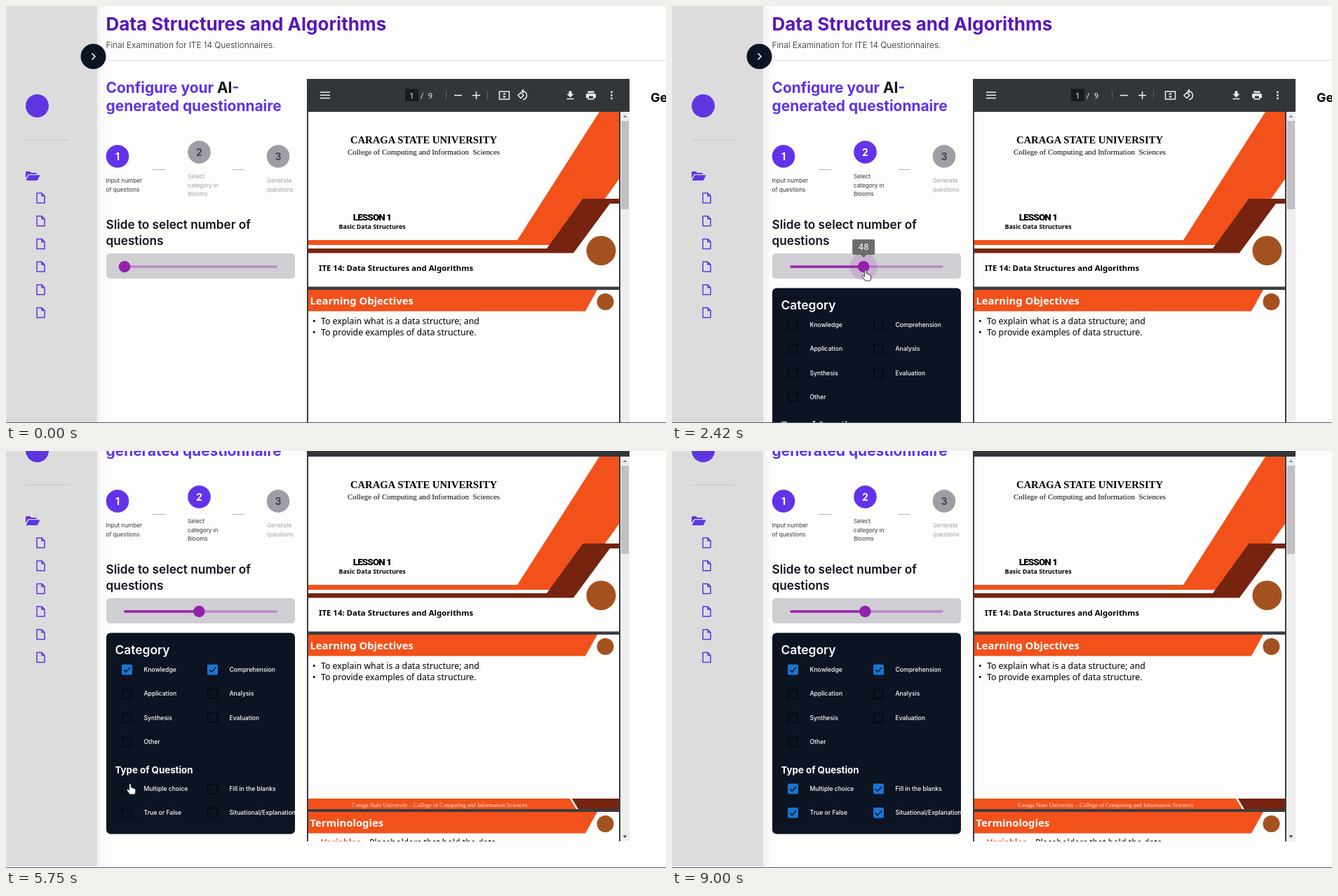
Write an HTML page that moves like this. It is 941 px wide and 595 px high and loops after 9.08 s.

```html
<!DOCTYPE html>
<html lang="en">
<head>
<meta charset="utf-8">
<title>Questionnaire setup</title>
<style>
html, body { margin: 0; width: 100%; height: 100%; overflow: hidden; background: #fdfdfc; }
svg { display: block; width: 100vw; height: 100vh; font-family: Inter, sans-serif; }
text { white-space: pre; }
.mid { text-anchor: middle; }
.title { font-size: 26px; font-weight: 700; fill: #5a17b8; }
.config { font-size: 20.9px; font-weight: 700; fill: #5f32ea; }
.slide { font-size: 17.2px; font-weight: 600; fill: #10131c; }
.step { font-size: 8.2px; fill: #333; }
.num { font-size: 14px; font-weight: 700; fill: #fff; text-anchor: middle; }
.off circle { fill: #9e9ea6; }
.off .num { fill: #44444f; }
.off .step { fill: #a0a0a4; }
.label { font-size: 8.65px; font-weight: 500; fill: #fff; }
.serif { font-family: "Liberation Serif", serif; }
.noto { font-family: "Noto Sans", sans-serif; }
.bold { font-weight: 700; }
.head { font-size: 14.8px; font-weight: 700; fill: #fff; }
.line { fill: none; stroke-width: 1.5; }
</style>
</head>
<body>
<svg viewBox="0 0 941 595" preserveAspectRatio="none">
  <defs>
    <clipPath id="view"><rect x="429" y="104" width="460" height="596"/></clipPath>
    <clipPath id="card"><rect x="143" y="402.5" width="269.5" height="287"/></clipPath>
    <linearGradient id="shade">
      <stop stop-color="#f3f3f3"/><stop offset="1" stop-color="#fdfdfc"/>
    </linearGradient>
    <path id="file" class="line" stroke="#5f35e0" stroke-linejoin="round"
      d="M-5.5-7H1.5L5.5-3V7H-5.5ZM1.5-7V-3H5.5"/>
  </defs>
  <g id="page">
    <rect x="130" width="14" height="736" fill="url(#shade)"/>
    <rect width="130" height="736" fill="#dcdcdd"/>
    <circle cx="44.5" cy="142.5" r="16.5" fill="#5f35e0"/>
    <path d="M28 191.5H89" stroke="#c4c4c8"/>
    <path d="M28 246V237.5Q28 236 29.5 236H34L36 238H42.5Q44 238 44 240H33Q31.5 240 30.8 241.2ZM33.2 241.3H48.5L45 248.3Q44.6 249 43.8 249H28.5L32 242Q32.4 241.3 33.2 241.3Z" fill="#5f35e0"/>
    <g id="files"></g>
    <text class="title" x="142.5" y="35">Data Structures and Algorithms</text>
    <text x="142.5" y="60" font-size="11.9" font-weight="300" fill="#222">Final Examination for ITE 14 Questionnaires.</text>
    <path d="M130 77.5H941" stroke="#dedee2"/>
    <circle cx="124.5" cy="72" r="18" fill="#0c1424"/>
    <path class="line" d="M122.5 67.5L127 72L122.5 76.5" stroke="#fff"/>

    <text class="config" x="142.5" y="123.5">Configure your <tspan fill="#10131c">AI</tspan>-</text>
    <text class="config" x="142.5" y="149.5">generated questionnaire</text>
    <g id="steps"></g>
    <path d="M209 233.5H227M322.5 233.5H339.5" stroke="#b4b4b8"/>
    <text class="slide" x="142.5" y="318">Slide to select number of</text>
    <text class="slide" x="142.5" y="341">questions</text>

    <rect x="143" y="353" width="269" height="36" rx="5" fill="#cfcfd3"/>
    <g fill="none" stroke="#9c27b0" stroke-width="3.5" stroke-linecap="round">
      <path d="M170 372H385" opacity=".42"/>
      <path id="track"/>
    </g>
    <g id="thumb">
      <circle id="halo" fill="#9c27b0" opacity=".18"/>
      <circle r="8.3" fill="#9321ab"/>
      <g id="tip">
        <path d="M-14-39H14Q16-39 16-37V-19Q16-17 14-17H4L0-13L-4-17H-14Q-16-17-16-19V-37Q-16-39-14-39Z" fill="#6c6c6c"/>
        <text id="value" class="mid" y="-24" font-size="12" fill="#fff"></text>
      </g>
    </g>

    <g id="panel">
      <rect x="143" y="402.5" width="269" height="287" rx="6" fill="#0c1322"/>
      <text x="155.5" y="432.5" font-size="17.4" font-weight="600" fill="#fff">Category</text>
      <text x="155.5" y="602.5" font-size="13.3" font-weight="700" fill="#fff">Type of Question</text>
      <g id="boxes" clip-path="url(#card)"></g>
    </g>

    <text x="919" y="136.5" font-size="18" font-weight="700" fill="#000">Ge</text>
    <g clip-path="url(#view)">
      <rect x="429" y="104" width="460" height="596" fill="#3a3d41"/>
      <rect x="429" y="104" width="460" height="47" fill="#323639"/>
      <g class="line" stroke="#f1f1f1" stroke-width="1.5">
        <path d="M448 123H462M448 127.3H462M448 131.5H462M639 127.5H650M665 127.5H676M670.5 122V133"/>
        <path d="M703.5 122H717.5V133H703.5Z"/>
        <path d="M734 123.5L738 127.5L734 131.5L730 127.5ZM736 121.5A6 6 0 1 1 737 133.5M738 119L735.5 121.5L738 124"/>
        <path d="M799.5 132.5H809.5"/>
      </g>
      <path d="M627.5 121V133M686.5 121V133" stroke="#63676a"/>
      <rect x="569" y="118" width="19" height="18" fill="#191b1c"/>
      <g fill="#f1f1f1">
        <g class="mid" font-family="Roboto, sans-serif" font-size="11.5">
          <text x="578.5" y="131.5">1</text><text x="593" y="131.5">/</text><text x="605" y="131.5">9</text>
        </g>
        <path d="M710.5 123.5L713 126.5H708ZM710.5 131.5L713 128.5H708Z"/>
        <path d="M802.5 121.5H806.5V125.5H809.5L804.5 130.5L799.5 125.5H802.5Z"/>
        <path d="M829.5 121.5H838.5V124H829.5ZM828.5 125H839.5Q841 125 841 126.5V131H838.5V133.5H829.5V131H827V126.5Q827 125 828.5 125ZM831 128.5V132H837V128.5Z" fill-rule="evenodd"/>
        <circle cx="863.5" cy="123" r="1.4"/><circle cx="863.5" cy="127.5" r="1.4"/><circle cx="863.5" cy="132" r="1.4"/>
      </g>

      <rect x="876" y="151" width="13" height="549" fill="#eeeeef"/>
      <rect x="877" y="164" width="11" height="126" fill="#c1c1c3"/>
      <path d="M879.5 159L882.5 155.5L885.5 159Z" fill="#8b8b8b"/>
      <path d="M879.5 691.5L882.5 695L885.5 691.5Z" fill="#444"/>

      <path d="M431 151H874V400.5H431ZM431 405H874V654H431ZM431 658H874V700H431Z" fill="#fdfdfc"/>
      <path d="M846 151H874V247L854 275H822L775 341H431V334H729Z" fill="#f2511b"/>
      <path d="M822 275H874V282H861L809 352.5H431V346H771Z" fill="#762310"/>
      <g class="mid" fill="#000">
        <text class="serif bold" x="595.5" y="196" font-size="14.7">CARAGA STATE UNIVERSITY</text>
        <text class="serif" x="595.5" y="211.5" font-size="11.05">College of Computing and Information  Sciences</text>
        <text x="522" y="305.5" font-family="Roboto, sans-serif" font-size="13.5" font-weight="900" letter-spacing="-.9">LESSON 1</text>
        <text class="noto bold" x="522" y="318" font-size="8.9">Basic Data Structures</text>
      </g>
      <text class="noto bold" x="446" y="378" font-size="11.4">ITE 14: Data Structures and Algorithms</text>
      <circle cx="848.5" cy="349" r="21" fill="#a3521f"/>

      <g id="heads" class="noto"></g>
      <g class="noto" font-size="12.3" fill="#000">
        <text x="437" y="454">•</text><text x="449" y="454">To explain what is a data structure; and</text>
        <text x="437" y="469.5">•</text><text x="449" y="469.5">To provide examples of data structure.</text>
        <text class="bold" x="449" y="705.5" fill="#f2511b">Variables</text>
        <text x="518" y="705.5">Placeholders that hold the data</text>
      </g>
      <path d="M431 639H804L813 654H431Z" fill="#f2511b"/>
      <path d="M807 639H874V654H816Z" fill="#762310"/>
      <text class="serif mid" x="618" y="650.5" font-size="8.35" fill="#fbe3d8">Caraga State University – College of Computing and Information Sciences</text>
    </g>
  </g>
  <path d="M0 594.5H941" stroke="#55556f"/>
  <g id="cursor" stroke-linejoin="round">
    <path id="hand" fill="#fff" stroke="#222" stroke-width=".9" d="M-1.3 1Q-1.3-.5 0-.5Q1.3-.5 1.3 1V5Q3.5 4.5 3.8 6Q5.8 5.5 6 7Q7.8 6.8 7.8 8.5V11Q7.8 12.5 6.5 15H-.5L-4.5 9.5Q-5.3 8-4 7.5Q-3 7.2-1.3 9Z"/>
    <path id="arrow" fill="#fff" stroke="#222" stroke-width=".9" d="M0 0V13.5L3.2 10.5L5.4 15.3L7.4 14.4L5.3 9.7H9.6Z"/>
    <path id="beam" fill="none" stroke="#555" d="M-3-6H-1Q0-6 0-5V5Q0 6-1 6H-3M3-6H1Q0-6 0-5M0 5Q0 6 1 6H3"/>
  </g>
</svg>
<script>
const LOOP = 9080, PICK = 1520;
const $ = id => document.getElementById(id);
const set = (el, attrs) => { for (const k in attrs) el.setAttribute(k, attrs[k]); };
const show = (el, on) => el.setAttribute('visibility', on ? 'visible' : 'hidden');

$('files').innerHTML = Array.from({ length: 6 }, (_, i) =>
  `<use href="#file" x="49.5" y="${274 + 32.7 * i}"/>`).join('');

const steps = [
  [159, 214.5, 142.5, 'Input number', 'of questions'],
  [275.5, 208.5, 259, 'Select', 'category in', 'Blooms'],
  [388, 214.5, 372, 'Generate', 'questions']
];
$('steps').innerHTML = steps.map(([x, y, left, ...lines], i) =>
  `<g class="${i ? 'off' : ''}"><circle cx="${x}" cy="${y}" r="16.3" fill="#6233ea"/>
  <text class="num" x="${x}" y="${y + 5}">${i + 1}</text>` +
  lines.map((s, k) => `<text class="step" x="${left}" y="${y + 37.7 + 12.6 * k}">${s}</text>`).join('') +
  '</g>').join('');

$('heads').innerHTML = [['Learning Objectives', 405], ['Terminologies', 658]].map(([s, y]) =>
  `<path d="M431 ${y}H843L826 ${y + 30.5}H431Z" fill="#f2511b"/>
  <text class="head" x="433.5" y="${y + 21}">${s}</text>
  <circle cx="854.5" cy="${y + 17}" r="12" fill="#a3521f"/>`).join('');

// label, column, row centre, time of the click
const options = [
  ['Knowledge', 0, 455, 3200], ['Comprehension', 1, 455, 4050],
  ['Application', 0, 489.3], ['Analysis', 1, 489.3],
  ['Synthesis', 0, 523.5], ['Evaluation', 1, 523.5],
  ['Other', 0, 557.7],
  ['Multiple choice', 0, 625, 5880], ['Fill in the blanks', 1, 625, 6950],
  ['True or False', 0, 659.3, 6400], ['Situational/Explanation', 1, 659.3, 7500]
];
$('boxes').innerHTML = options.map(([s, col, y]) =>
  `<g transform="translate(${172.5 + 122 * col} ${y})">
  <circle class="ripple" r="15" fill="#1976d2" opacity="0"/>
  <rect x="-6.7" y="-6.7" width="13.4" height="13.4" rx="1.5" fill="none" stroke="#03060d" stroke-width="1.6"/>
  <g class="tick"><rect x="-7.5" y="-7.5" width="15" height="15" rx="2" fill="#1976d2"/>
  <path class="line" d="M-4.5 .3L-1.5 3.3L4.8-3.3" stroke="#0c1322"/></g>
  <text class="label" x="24" y="3">${s}</text></g>`).join('');
const boxes = [...$('boxes').children];

const smooth = u => u * u * (3 - 2 * u);
const linear = u => u;

// Value of column c in keys [time, ...values] at time t
function at(keys, t, ease = smooth, c = 1) {
  const n = keys.findIndex(k => k[0] > t);
  if (n < 0) return keys[keys.length - 1][c];
  if (n === 0) return keys[0][c];
  const a = keys[n - 1], b = keys[n];
  return a[c] + (b[c] - a[c]) * ease((t - a[0]) / (b[0] - a[0]));
}

const path = [
  [1000, 300, 600], [1480, 262, 373], [1700, 262, 373], [2420, 276, 377],
  [2600, 278, 378], [2950, 173, 454], [3350, 173, 454], [3800, 295, 454],
  [4250, 295, 454], [4560, 294, 319], [5150, 294, 319], [5700, 177, 475],
  [5980, 177, 475], [6280, 175, 511], [6480, 175, 511], [6790, 305, 474],
  [7050, 300, 476], [7380, 297, 511], [7650, 297, 511], [8290, 400, -20]
];
const picked = [[PICK, 0], [1640, 43], [1700, 43], [2420, 48], [2560, 49]];
const fade = [[1500, 0], [1670, .7], [1830, 1]];
const glow = [[1580, 8], [1760, 19.5], [2600, 19.5], [2750, 8]];
const label = [[1500, 0], [1620, 1], [2680, 1], [2800, 0]];
const scroll = [[4960, 0], [5380, 143]];

function drawCursor(t, top) {
  const x = at(path, t), y = at(path, t, smooth, 2), py = y + top;
  const inside = x > 143 && x < 412;
  const onRow = options.some(o => Math.abs(py - o[2]) < 11) && t > PICK;
  const hand = inside && (py > 353 && py < 389 || onRow);
  const beam = inside && py > 300 && py < 345;
  set($('cursor'), { transform: `translate(${x} ${y})` });
  const live = t >= 1000 && t < 8290;
  show($('hand'), live && hand);
  show($('beam'), live && beam);
  show($('arrow'), live && !hand && !beam);
}

function draw(t) {
  const top = at(scroll, t);
  set($('page'), { transform: `translate(0 ${-top})` });

  const value = at(picked, t), x = 169 + 2.17 * value;
  set($('thumb'), { transform: `translate(${x} 372)` });
  set($('track'), { d: `M170 372H${Math.max(170, x)}` });
  set($('halo'), { r: at(glow, t, linear) });
  const grow = at(label, t);
  set($('tip'), { transform: `translate(0 ${-13 * (1 - grow)}) scale(${grow})` });
  $('value').textContent = Math.round(value);

  const shown = at(fade, t, linear);
  set($('panel'), { opacity: shown, transform: `translate(0 ${-5 * (1 - shown)})` });
  set($('steps').children[1], { class: t < PICK ? 'off' : '' });

  boxes.forEach((box, i) => {
    const age = t - options[i][3];
    show(box.querySelector('.tick'), age >= 0);
    set(box.querySelector('.ripple'), { opacity: age >= 0 && age < 550 ? .3 * (1 - age / 550) : 0 });
  });
  // The halo only shows while the pointer is on the slider
  show($('halo'), t > 1500 && t < 2750);
  drawCursor(t, top);
}

const start = performance.now();
function frame() {
  draw((performance.now() - start) % LOOP);
  requestAnimationFrame(frame);
}
frame();
</script>
</body>
</html>
```
